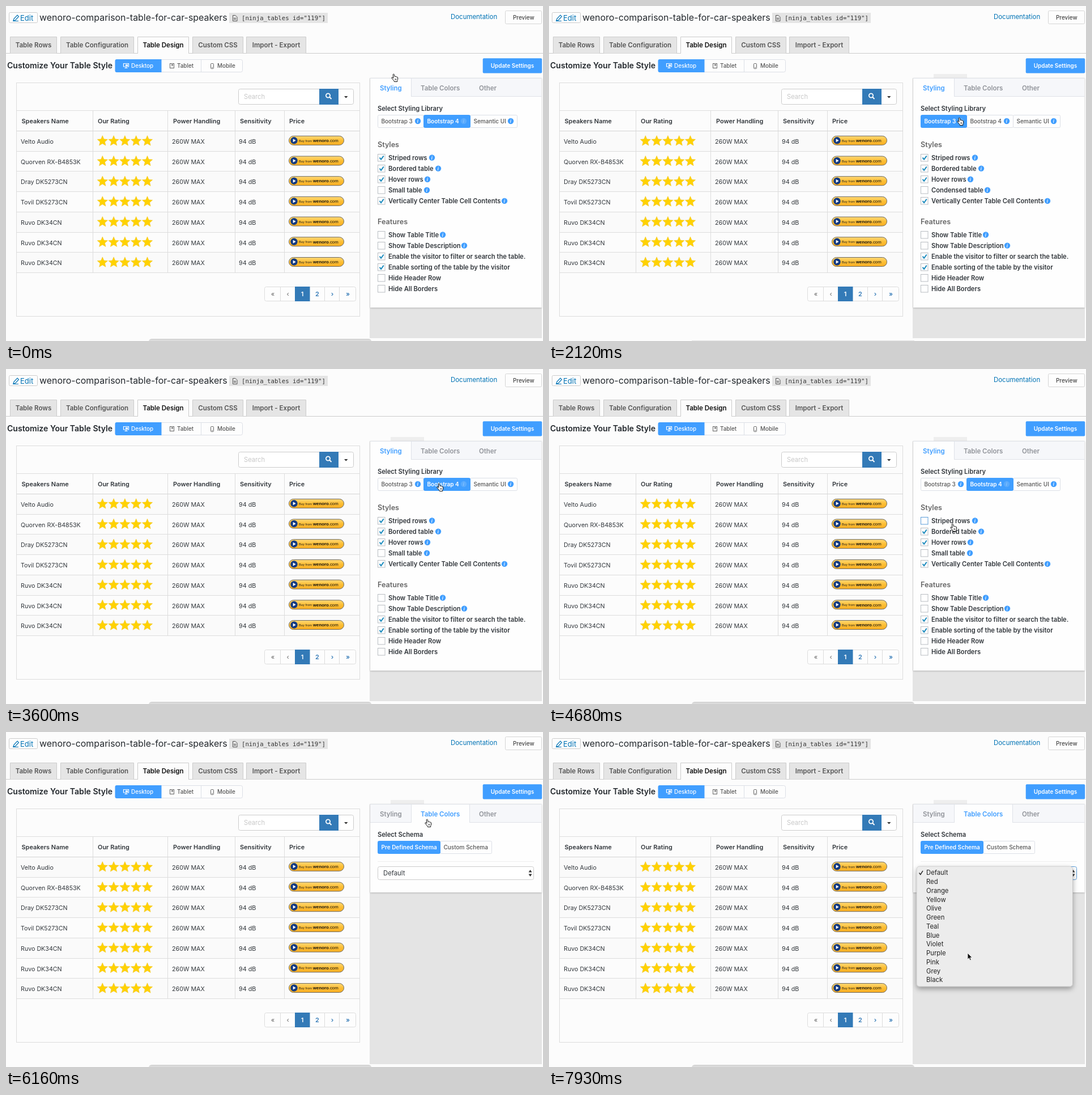
An HTML page that plays this animation: 948x591 px, repeating every 8 s.

```html
<!DOCTYPE html>
<html lang="en">
<head>
<meta charset="utf-8">
<title>Table design settings</title>
<style>
  html, body { margin: 0; width: 100%; height: 100%; overflow: hidden; background: #fcfcfc; }
  svg { display: block; font-family: Inter, Roboto, sans-serif; }
  .mono { font-family: "DejaVu Sans Mono", monospace; }
  .label { font-family: "Liberation Sans", sans-serif; }
</style>
</head>
<body>
<svg width="948" height="591" viewBox="0 0 948 591">
  <defs>
    <linearGradient id="gold" x2="0" y2="1">
      <stop stop-color="#ffd877"/><stop offset=".5" stop-color="#fdbf35"/><stop offset="1" stop-color="#f9ad22"/>
    </linearGradient>
    <filter id="soft" x="-10%" y="-10%" width="120%" height="125%">
      <feDropShadow dx="0" dy="1" stdDeviation="1.5" flood-opacity=".22"/>
    </filter>
    <filter id="deep" x="-10%" y="-10%" width="120%" height="125%">
      <feDropShadow dx="0" dy="4" stdDeviation="5" flood-opacity=".35"/>
    </filter>
  </defs>
  <g id="page"></g>
  <g id="panel"></g>
  <g id="cursor"></g>
</svg>
<script>
const LOOP = 8000, BLUE = '#409eff', DARK = '#337ab7', LINK = '#0073b5', INK = '#32373c', LINE = '#ddd', PAPER = '#fcfcfc';
const $ = id => document.getElementById(id);

const text = (x, y, s, size, weight = 400, fill = INK, extra = '') =>
  `<text x="${x}" y="${y}" font-size="${size}" font-weight="${weight}" fill="${fill}" ${extra}>${s}</text>`;
const mid = (x, y, s, size, weight, fill) => text(x, y, s, size, weight, fill, 'text-anchor="middle"');
const rect = (x, y, w, h, fill, stroke = 'none', r = 0, extra = '') =>
  `<rect x="${x}" y="${y}" width="${w}" height="${h}" fill="${fill}" stroke="${stroke}" rx="${r}" ${extra}/>`;
const path = (d, fill, stroke = 'none', extra = '') => `<path d="${d}" fill="${fill}" stroke="${stroke}" ${extra}/>`;
const at = (x, y, s) => `<g transform="translate(${x} ${y})">${s}</g>`;

function header() {
  const tabs = [[7, 83, 'Table Rows'], [96, 130, 'Table Configuration'], [232, 91, 'Table Design'],
    [329, 90, 'Custom CSS'], [424, 106, 'Import - Export']];
  return rect(5.5, 11.5, 50, 18, '#fdfdfd', '#ccc', 2) +
    at(12, 15, path('M1 11 L2 7.5 L8 1 L10.5 3.5 L4.5 10 Z M0 11.5 H10', 'none', LINK, 'stroke-width="1.2"')) +
    text(25, 25.5, 'Edit', 13, 400, LINK) +
    text(59, 25.5, 'wenoro-comparison-table-for-car-speakers', 15.95, 400, '#23282d') +
    rect(394, 12, 174, 18, '#e4e4e4') +
    at(400, 16, path('M.5 .5 H5 L8 3.5 V10.5 H.5 Z M2 5.5 H6 M2 7.5 H6', 'none', '#555')) +
    text(416, 25, '[ninja_tables id="119"]', 10.7, 400, '#333', 'class="mono"') +
    text(785, 23, 'Documentation', 11.45, 400, LINK) +
    rect(881.5, 8.5, 64, 23, '#fdfdfd', '#d5d5d5', 2) + mid(913.8, 23.5, 'Preview', 9.9, 500, '#444') +
    path('M0 83.5 H948', 'none', '#ccc') +
    tabs.map(([x, w, s]) => {
      const on = s === 'Table Design';
      return path(`M${x + .5} 83.5 V54.5 H${x + w - .5} V83.5`, on ? PAPER : '#e5e5e5', '#ccc') +
        (on ? rect(x + 1, 83, w - 2, 1, PAPER) : '') +
        mid(x + w / 2, 73, s, 11.55, 600, on ? '#111' : '#555');
    }).join('') +
    text(2, 110, 'Customize Your Table Style', 14.05, 600, '#23282d') +
    rect(193.5, 94.5, 224, 22, '#fdfdfd', '#dcdfe6', 3) + path('M344.5 94 V117', 'none', '#dcdfe6') +
    path('M274.5 94 H195.5 a3 3 0 0 0 -3 3 V114 a3 3 0 0 0 3 3 H274.5 Z', BLUE) +
    at(207, 101, path('M.5 .5 H9.5 V6 H.5 Z M2.5 8.5 H7.5 M5 6 V8', 'none', '#fff', 'stroke-width="1.2"') + rect(4, 2, 4, 3, '#fff')) +
    at(289, 101, rect(.5, .5, 7, 8, 'none', '#666') + rect(3, 2, 3, 2, '#666')) +
    at(361, 101, rect(.5, .5, 5, 9, 'none', '#666', 1) + rect(2, 7, 2, 1, '#666')) +
    text(221, 109, 'Desktop', 9.9, 500, '#fff') + text(302, 109, 'Tablet', 9.9, 500, '#555') +
    text(373, 109, 'Mobile', 9.9, 500, '#555') +
    rect(841.7, 92.3, 104.5, 26.2, BLUE, 'none', 2) + mid(894, 108.7, 'Update Settings', 9.9, 600, '#fff');
}

function star(x, y) {
  let d = '';
  for (let i = 0; i < 10; i++) {
    const r = i % 2 ? 4.4 : 9.7, a = i * Math.PI / 5;
    d += `${i ? 'L' : 'M'}${(x + r * Math.sin(a)).toFixed(1)} ${(y - r * Math.cos(a)).toFixed(1)}`;
  }
  return path(d + 'Z', '#ffd200', '#efc02c', 'stroke-width=".5" stroke-linejoin="round"');
}

const buyButton = y => at(499, y, rect(.5, .5, 97, 16, 'url(#gold)', '#6d6a62', 8) +
  '<circle cx="9.5" cy="8.5" r="6.2" fill="#143a80"/>' + path('M7.7 5.5 L12.6 8.5 L7.7 11.5 Z', '#fff') +
  text(18, 11, 'Buy from', 5.8, 400, '#222', 'class="label"') +
  text(43, 11.3, 'wenoro<tspan font-weight="400">.com</tspan>', 7.8, 700, '#111', 'class="label"'));

function table() {
  const names = ['Velto Audio', 'Quorven RX-B4853K', 'Dray DK5273CN', 'Tovil DK5273CN',
    'Ruvo DK34CN', 'Ruvo DK34CN', 'Ruvo DK34CN'];
  const step = 35.7, top = 221;
  const heads = [[27.5, 'Speakers Name'], [162, 'Our Rating'], [295, 'Power Handling'], [413, 'Sensitivity'], [500, 'Price']];
  let s = rect(18.5, 135.5, 606, 412, PAPER, LINE) + '<g id="stripes">';
  for (let i = 0; i < 7; i += 2) s += rect(19, top + i * step, 605, step, '#fafafa');
  s += '</g>' + path('M19 184.5 H625 M153.5 185 V471 M285.5 185 V471 M404.5 185 V471 M491.5 185 V471', 'none', LINE);
  s += heads.map(([x, h]) => text(x, 206.5, h, 10.95, 600)).join('');
  for (let i = 0; i <= 7; i++) s += path(`M19 ${Math.floor(top + i * step - .5) + .5} H625`, 'none', i ? LINE : '#d5d5d5');
  names.forEach((n, i) => {
    const y = i * step;
    s += text(26, 243 + y, n, 10.7) + text(293, 243 + y, '260W MAX', 10.7) + text(411, 243 + y, '94 dB', 10.8);
    for (let k = 0; k < 5; k++) s += star(170.3 + k * 19.8, 238.3 + y);
    s += buyButton(228.8 + y);
  });
  s += rect(410.5, 146.5, 203, 27, '#fff', '#ccc', 3) + rect(553, 146, 34, 28, DARK) +
    text(420, 164, 'Search', 11.2, 400, '#c8c8c8') +
    '<circle cx="568.5" cy="158" r="3.6" fill="none" stroke="#fff" stroke-width="1.8"/>' +
    path('M571 160.5 L574.5 164', 'none', '#fff', 'stroke-width="2"') + path('M597 159 H603.5 L600.2 162.5 Z', '#333');
  const edges = [457, 485, 510, 536, 563, 589, 618];
  s += rect(456.5, 495.5, 161, 25, '#fdfdfd', LINE, 3);
  ['«', '‹', '1', '2', '›', '»'].forEach((c, i) => {
    const x = edges[i], w = edges[i + 1] - x, on = c === '1';
    if (on) s += rect(x, 495, w + .5, 26, DARK);
    else if (i && c !== '2') s += path(`M${x - .5} 495 V521`, 'none', LINE);
    s += mid(x + w / 2, 512, c, 11, i < 2 ? 400 : 600, i < 2 ? '#666' : on ? '#fff' : DARK);
  });
  return s;
}

const info = (x, y, faint) => `<circle cx="${x}" cy="${y}" r="5.2" fill="${faint ? '#5aabfd' : BLUE}"/>` +
  text(x - 1.2, y + 3, 'i', 8, 600, faint ? '#8cc5ff' : '#fff', 'font-style="italic"');

function check(y, [label, on, tip], focus) {
  return rect(656.5, Math.round(y - 7) + .5, 12.5, 12.5, '#fff', focus ? '#5b9dd9' : '#b9bdc2') +
    (on ? path(`M659.5 ${y} l2.6 3.2 l4.6 -6.4`, 'none', '#1e8cbe', 'stroke-width="2"') : '') +
    text(675, y + 4, label, 11.2, 600) + (tip ? info(tip, y) : '');
}

// Neighbouring buttons share a border; the active one lies on top.
function choices(y, items) {
  return [...items].sort((a, b) => a[3] - b[3]).map(([x, w, label, on, hover, tip]) =>
    rect(x + .5, y + .5, w - 1, 22, on ? BLUE : '#fefefe', on ? BLUE : '#dcdfe6', 2) +
    text(x + 6.5, y + 15, label, 10, on ? 600 : 500, on ? '#fff' : hover ? BLUE : '#555') +
    (tip ? info(tip, y + 11, on) : '')).join('');
}

function panelFrame(active, bottom, hover) {
  const tabs = [[643, 716, 660, 'Styling'], [716, 819, 732, 'Table Colors'], [819, 945, 835, 'Other']];
  return rect(642, 127, 304, 459, '#e4e4e4') +
    rect(643, 127, 302.5, bottom - 127, '#fefefe', 'none', 0, 'filter="url(#soft)"') +
    rect(643, 128, 302, 32, '#f6f7fa') + path('M643 159.5 H945.5 M643 127.5 H945.5', 'none', '#dfe2e8') +
    tabs.map(([a, b, x, s], i) => (i === active ?
      rect(a, 128, b - a, 32, '#fefefe') + path(`${i ? `M${a - .5} 128 V160` : ''}M${b - .5} 128 V160`, 'none', '#dfe2e8') : '') +
      text(x, 148.5, s, 11.45, 600, i === active || i === 1 && hover ? BLUE : '#909399')).join('');
}

function stylingPanel({ bs3, striped, focus, hover }) {
  const styles = [['Striped rows', striped, 752], ['Bordered table', 1, 763], ['Hover rows', 1, 744],
    bs3 ? ['Condensed table', 0, 774] : ['Small table', 0, 743], ['Vertically Center Table Cell Contents', 1, 880]];
  const features = [['Show Table Title', 0, 771], ['Show Table Description', 0, 809],
    ['Enable the visitor to filter or search the table.', 1], ['Enable sorting of the table by the visitor', 1],
    ['Hide Header Row', 0], ['Hide All Borders', 0]];
  return panelFrame(0, 532, hover === 'tab') +
    text(656, 184.5, 'Select Styling Library', 11.15, 600) +
    choices(192, [[656, 82, 'Bootstrap 3', bs3, hover === 'bs3', 727], [737, 83, 'Bootstrap 4', !bs3, hover === 'bs4', 808],
      [819, 84, 'Semantic UI', false, false, 891]]) +
    text(656, 249, 'Styles', 12.6, 600, '#666') +
    styles.map((c, i) => check(267.5 + i * 19.1, c, focus && !i)).join('') +
    text(656, 385, 'Features', 12.6, 600, '#666') +
    features.map((c, i) => check(403.5 + i * 19.1, c)).join('');
}

const colors = ['Default', 'Red', 'Orange', 'Yellow', 'Olive', 'Green', 'Teal', 'Blue', 'Violet', 'Purple', 'Pink', 'Grey', 'Black'];
const PITCH = 15.77, FIRST = 240.8;
function colorPanel({ open, lit }) {
  let s = panelFrame(1, 283) + text(656, 184.5, 'Select Schema', 11.15, 600) +
    choices(192, [[656, 111, 'Pre Defined Schema', true], [766, 92, 'Custom Schema', false]]) +
    path('M656 228.5 H932', 'none', '#eee') +
    rect(656.5, 237.5, 275, 23, '#fff', open ? '#5b9dd9' : '#ccc', 3) +
    path('M922.5 247.5 L925.5 243 L928.5 247.5 Z M922.5 250.5 L925.5 255 L928.5 250.5 Z', '#333');
  if (!open) return s + text(666, 253, 'Default', 11.3);
  s += rect(649, 237, 275.5, 212, '#ececec', '#b8b8b8', 5, 'stroke-width=".6" filter="url(#deep)"');
  if (lit >= 0) s += rect(649, FIRST + lit * PITCH, 275.5, PITCH, '#3c82f7');
  colors.forEach((c, i) => s += text(666, 252.2 + i * PITCH, c, 11.3, 400, i === lit ? '#fff' : '#222'));
  return s + path('M653.5 248.5 l2.3 3 l4.2 -6.6', 'none', lit === 0 ? '#fff' : '#222', 'stroke-width="1.4"');
}

// Pointer keys: time, x, y; moves between them advance in steps of about 150 ms.
const keys = [[0, 680, 119], [595, 680, 119], [1060, 729, 143], [1380, 714, 187], [1680, 712, 195], [1830, 712, 195],
  [2710, 760, 201], [3460, 760, 201], [3780, 709, 253], [3930, 709, 253], [4230, 708, 272], [5280, 708, 272],
  [6010, 739, 153], [6160, 739, 153], [6310, 738, 170], [6600, 731, 239], [6900, 731, 239], [7480, 739, 390], [LOOP, 739, 390]];
function pointer(t) {
  const i = keys.findIndex(k => k[0] > t), [t0, x0, y0] = keys[i - 1], [t1, x1, y1] = keys[i];
  const n = Math.round((t1 - t0) / 150), u = Math.floor((t - t0) / (t1 - t0) * n + 1e-6) / n;
  return [x0 + (x1 - x0) * u, y0 + (y1 - y0) * u];
}

const hand = path('M3.2 1.8 Q4.4 .1 5.5 1.9 L6.1 5.4 Q7.2 4.8 7.9 5.6 Q9 5.2 9.6 6.1 Q11 5.8 11.4 7 L11.7 10 Q11.5 11.5 10.7 12.4 V14.5 H5.4 L4.8 12.8 L1 8.3 Q.5 6.8 2 6.8 L4 8.3 Z',
  '#fff', '#111', 'stroke-linejoin="round"') + path('M7 9 V12 M8.7 9 V12', 'none', '#111', 'stroke-width=".7"');
const arrow = path('M0 0 V11.2 L2.6 8.8 L4.3 12.8 L6.3 12 L4.6 8.1 H8 Z', '#111', '#fff', 'stroke-width=".8"');

$('page').innerHTML = header() + table() + rect(679, 120, 59, 7, '#eee', 'none', 0, 'id="strip"') +
  path('M252 591 Q253 587 258 587 H639 Q644 587 645 591 Z', '#d6d6d6', 'none', 'id="bar"') +
  rect(252, 590, 393, 1, '#e2e2e2');

let shown = '', shape = '';
function draw(now) {
  const t = now % LOOP, during = (a, b) => t >= a && t < b;
  const [x, y] = pointer(t);
  const bs3 = during(1830, 3460), focus = during(4680, 5280), open = t >= 6900;
  const state = {
    colorTab: t >= 6160, bs3, focus, striped: !focus, open,
    hover: during(1060, 1530) || during(5870, 6160) ? 'tab' : during(1530, 1830) ? 'bs3' : bs3 && x > 734 ? 'bs4' : '',
    lit: during(7040, 7930) ? Math.floor((y - FIRST) / PITCH) : -1
  };
  const key = JSON.stringify(state);
  if (key !== shown) {
    $('panel').innerHTML = state.colorTab ? colorPanel(state) : stylingPanel(state);
    $('stripes').style.opacity = +state.striped;
    $('bar').style.opacity = +!bs3;
    shown = key;
  }
  $('strip').style.opacity = +(t >= 1060);
  const next = t < 6310 ? hand : arrow;
  if (next !== shape) $('cursor').innerHTML = shape = next;
  $('cursor').setAttribute('transform', `translate(${x.toFixed(1)} ${y.toFixed(1)})`);
  requestAnimationFrame(draw);
}
requestAnimationFrame(draw);
</script>
</body>
</html>
```
